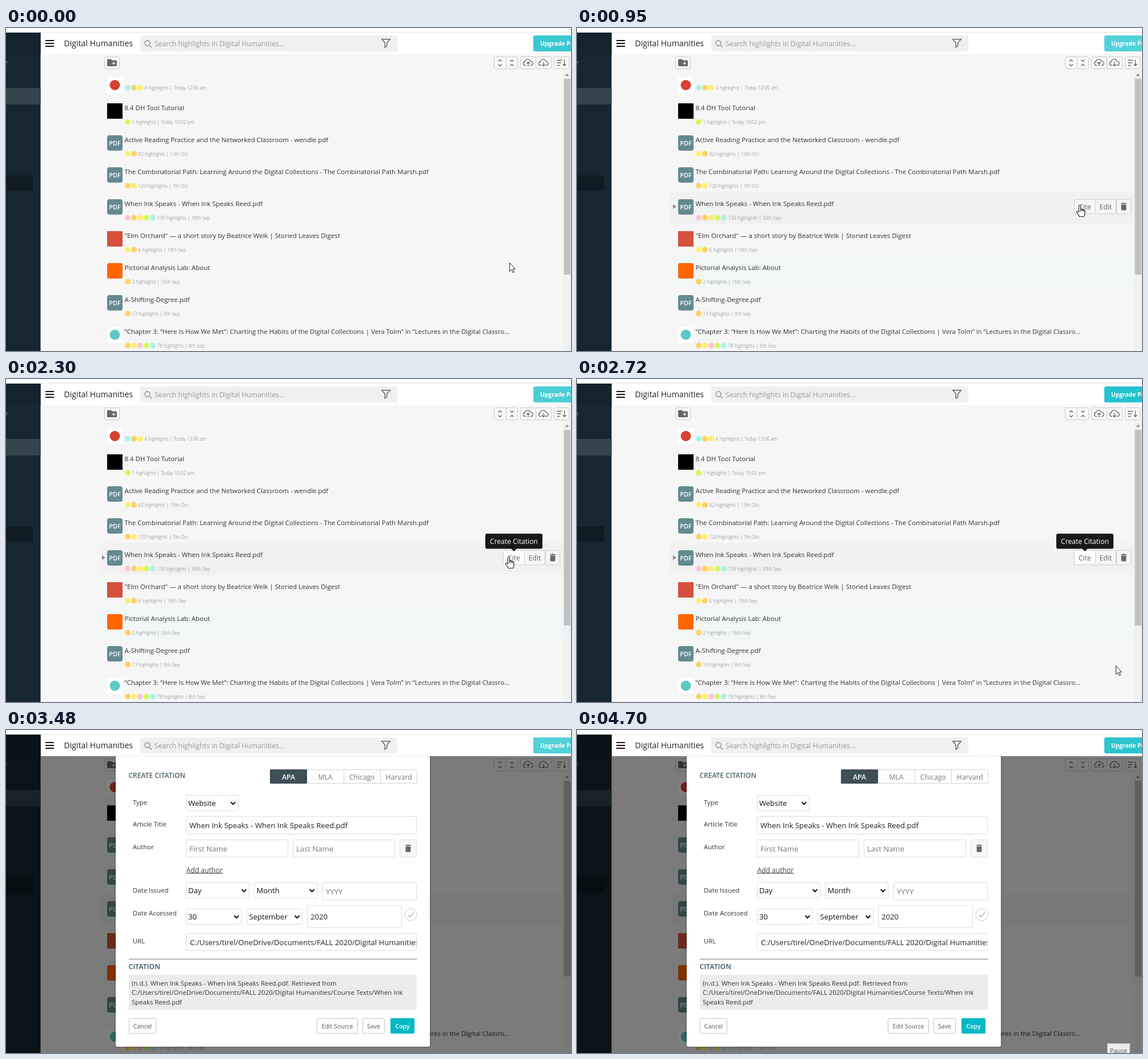
Recreate the animation shown at these times as an HTML page. Size 989x566 px, loop 4.75 s.

```html
<!DOCTYPE html>
<html lang="en">
<head>
<meta charset="utf-8">
<title>Create citation</title>
<style>
html, body { margin: 0; width: 100%; height: 100%; overflow: hidden; background: #fff; }
svg { display: block; }
text { font-family: "Open Sans", "Noto Sans", sans-serif; white-space: pre; }
.icon { fill: none; stroke: #666; stroke-width: 1.3; }
.mid { text-anchor: middle; }

#upgrade, #hover, #tools, #cite, #tip, #modal, #cursor, #arrow, #hand, #pause, #pauseBg {
  animation: 4750ms linear infinite;
}
#upgrade { animation-name: pulse; }
#hover { animation-name: hover; animation-timing-function: step-end; }
#tools { animation-name: tools; animation-timing-function: step-end; }
#cite { animation-name: cite; }
#tip { animation-name: tip; animation-timing-function: step-end; }
#modal { animation-name: modal; animation-timing-function: step-end; }
#cursor { animation-name: move; }
#arrow { animation-name: arrow; animation-timing-function: step-end; }
#hand { animation-name: hand; animation-timing-function: step-end; }
#pause { animation-name: pause; animation-timing-function: step-end; }
#pauseBg { animation-name: dim; animation-timing-function: step-end; }

@keyframes pulse {
  0%, 10.5% { fill: #3bc8d1; }
  20% { fill: #53d1d9; }
  30.7%, 36.2% { fill: #17bfcb; }
  48.4% { fill: #4bcfd7; }
  57.26% { fill: #26c3ce; }
  58.3% { fill: #22c2cc; }
  62% { fill: #14bec9; }
  73.7% { fill: #53d1d9; }
  86.7% { fill: #2ac4ce; }
  92.6% { fill: #17bfcb; }
  98.9%, 100% { fill: #2cc5cf; }
}
@keyframes hover {
  0% { opacity: 0; transform: translateY(112px); }
  11.4% { opacity: 1; transform: translateY(112px); }
  12.7% { opacity: 1; transform: translateY(56px); }
  15.9%, 100% { opacity: 1; transform: none; }
}
@keyframes tools { 0% { opacity: 1; } 58.3%, 100% { opacity: 0; } }
@keyframes cite { 0%, 20.8% { fill: #f6f6f6; } 23%, 100% { fill: #fff; } }
@keyframes tip { 0% { opacity: 0; } 21% { opacity: 1; } 58.3%, 100% { opacity: 0; } }
@keyframes modal { 0% { opacity: 0; } 58.3%, 100% { opacity: 1; } }
@keyframes move {
  0% { transform: translate(881px, 411px); }
  10.53% { transform: translate(881px, 411px); animation-timing-function: ease-in-out; }
  19.4%, 20.8% { transform: translate(881px, 310px); }
  22.5% { transform: translate(881px, 311px); }
  26% { transform: translate(876px, 311px); }
  30.7%, 36.2% { transform: translate(881px, 311px); }
  40% { transform: translate(879px, 311px); }
  44% { transform: translate(881px, 311px); }
  48.4% { transform: translate(881px, 311px); animation-timing-function: ease-in-out; }
  56.9%, 57.5% { transform: translate(943px, 502px); }
  58.3%, 60% { transform: translate(943px, 511px); }
  69.5%, 100% { transform: translate(947px, 570px); }
}
@keyframes arrow { 0% { opacity: 1; } 17% { opacity: 0; } 50.1%, 100% { opacity: 1; } }
@keyframes hand { 0% { opacity: 0; } 17% { opacity: 1; } 50.1%, 100% { opacity: 0; } }
@keyframes pause { 0% { opacity: 0; } 74% { opacity: 1; } 100% { opacity: 1; } }
@keyframes dim { 0% { fill: #fff; } 98.9%, 100% { fill: #ececec; } }
</style>
</head>
<body>
<svg id="stage" width="989" height="566" viewBox="0 0 989 566" xmlns="http://www.w3.org/2000/svg"></svg>
<script>
const rect = (x, y, x2, y2, fill, r = 0, id = '') =>
  `<rect ${id && `id="${id}"`} x="${x}" y="${y}" width="${x2 - x}" height="${y2 - y}" rx="${r}" fill="${fill}"/>`;

// Outlined box whose 1px border lies inside the given edges
const box = (x, y, x2, y2, fill = '#fff', line = '#ddd', r = 1, id = '') =>
  `<rect ${id && `id="${id}"`} x="${x + .5}" y="${y + .5}" width="${x2 - x - 1}" height="${y2 - y - 1}" rx="${r}" fill="${fill}" stroke="${line}"/>`;

const txt = (x, y, size, str, fill = '#333', weight = 400, extra = '') =>
  `<text x="${x}" y="${y}" font-size="${size}" fill="${fill}" font-weight="${weight}" ${extra}>${str}</text>`;

const mid = (x, y, size, str, fill, weight) => txt(x, y, size, str, fill, weight, 'class="mid"');
const icon = (d, extra = '') => `<path class="icon" d="${d}" ${extra}/>`;
const solid = (d, fill) => `<path d="${d}" fill="${fill}"/>`;
const circle = (x, y, r, fill) => `<circle cx="${x}" cy="${y}" r="${r}" fill="${fill}"/>`;

const trash = (x, y) => `<g transform="translate(${x} ${y})">` +
  solid('M-5-6h3l1-1h2l1 1h3v1.5h-10zM-4.4-3.6h8.8v8.4q0 1.7-1.6 1.7h-5.6q-1.6 0-1.6-1.7z', '#666') + '</g>';

const dots = { p: '#fbc5d8', o: '#fdd365', y: '#fef06e', g: '#d3fa5c', c: '#a8f4ee' };

const pdf = y => rect(177, y - 13.5, 204, y + 13.5, '#648a8f', 4) + mid(190.5, y + 4, 11, 'PDF', '#fff', 600);
const tile = (fill, r) => y => rect(177, y - 13.5, 204, y + 13.5, fill, r);
const disc = fill => y => rect(177, y - 13.5, 204, y + 13.5, '#fff') + circle(190.5, y, 9, fill);

const rows = [
  [disc('#d8412f'), '', 'coy', '4 highlights | Today 12:06 am'],
  [tile('#000'), '8.4 DH Tool Tutorial', 'g', '1 highlights | Today 10:02 pm'],
  [pdf, 'Active Reading Practice and the Networked Classroom - wendle.pdf', 'yo', '42 highlights | 13th Oct'],
  [pdf, 'The Combinatorial Path: Learning Around the Digital Collections - The Combinatorial Path Marsh.pdf', 'oy', '129 highlights | 7th Oct'],
  [pdf, 'When Ink Speaks - When Ink Speaks Reed.pdf', 'poygc', '139 highlights | 30th Sep'],
  [tile('#d4513d'), '"Elm Orchard" — a short story by Beatrice Welk | Storied Leaves Digest', 'yo', '6 highlights | 19th Sep'],
  [tile('#ff6600', 3), 'Pictorial Analysis Lab: About', 'o', '2 highlights | 16th Sep'],
  [pdf, 'A-Shifting-Degree.pdf', 'o', '13 highlights | 9th Sep'],
  [disc('#5cc9c4'), '“Chapter 3: “Here Is How We Met”: Charting the Habits of the Digital Collections | Vera Tolm” in “Lectures in the Digital Classro...', 'oypgc', '78 highlights | 8th Sep']
];

function row([mark, title, marks, meta], i) {
  const y = i ? 145 + 56 * (i - 1) : 99.5;
  const my = i ? y + 19.5 : 104.8;
  return mark(y + .5) + txt(207.5, y - 1, 11.45, title) +
    [...marks].map((c, k) => circle(213 + 11 * k, my, 5, dots[c])).join('') +
    txt(209.5 + 11 * marks.length, my + 3.2, 8.2, meta, '#777', 300);
}

const cloud = 'M-4 4.5h-1.5a3.3 3.3 0 0 1-.4-6.5a5.2 5.2 0 0 1 10-.6a3.6 3.6 0 0 1 1.2 7.1h-1.3M0';
const toolButton = (x, x2, d) => box(x, 50, x2, 72, '#f8f8f8', '#c9c9c9', 2) +
  icon(d, `transform="translate(${(x + x2) / 2} 61)"`);

const sidebar = rect(0, 8, 60.5, 566, '#162731') + rect(0, 8, 60.5, 46, '#13242e') +
  rect(0, 105, 60.5, 134, '#33444c') + rect(0, 258, 48, 285, '#0f1c24') +
  txt(-1.5, 65, 11.4, 'r', '#a9b3b8');

const toolbar = box(172, 50, 199, 72, '#f8f8f8', '#c9c9c9', 2) +
  solid('M177 56q0-1.5 1.500-1.500h5l2 2h7q1.500 0 1.500 1.500v7.500q0 1.500-1.500 1.500h-14q-1.500 0-1.500-1.500z', '#666') +
  icon('M188.500 58.800v6M185.500 61.800h6', 'style="stroke:#f8f8f8"') +
  toolButton(854, 876, 'M-3-2.500L0-5.500L3-2.500M-3 2.500L0 5.500L3 2.500') +
  toolButton(875, 896, 'M-3-5.500L0-2.500L3-5.500M-3 5.500L0 2.500L3 5.500') +
  toolButton(900, 928, cloud + ' 6v-7M-2.800 1.500L0-1.300L2.800 1.500') +
  toolButton(927, 955, cloud + '-1.500v7M-2.800 2.800L0 5.600L2.800 2.800') +
  toolButton(959, 986, 'M-8-4.500h9M-8 0h7M-8 4.500h5M5-5.500v10.500M2.200 2.200L5 5L7.800 2.200');

const scrollbar = rect(975, 73, 989, 566, '#f1f1f1') + solid('M978.500 84h7l-3.500-4z', '#8a8a8a') +
  rect(976.5, 89, 988, 432, '#c1c1c1');

const hover = `<g id="hover">${rect(164, 287, 975, 343, '#f1f1f1')}<g id="tools">` +
  solid('M168 309v8l6-4z', '#8b8b8b') +
  box(870, 300, 908, 326, '#f6f6f6', '#cfcfcf', 1, 'cite') + box(907, 300, 944, 326, '#f6f6f6', '#cfcfcf') +
  box(944, 300, 970, 326, '#f6f6f6', '#cfcfcf') +
  mid(889, 317.5, 12.2, 'Cite', '#666') + mid(925.5, 317.5, 12.2, 'Edit', '#666') + trash(957, 313) + '</g></g>';

const trail = `<g style="animation:modal 4750ms infinite step-end;animation-name:trail">${rect(164, 399, 975, 455, '#f2f6f7')}</g>`;

const tip = `<g id="tip">${rect(839, 271, 939, 297.5, '#191919', 3)}${solid('M884 297h10l-5 5z', '#191919')}` +
  mid(889, 289, 12.1, 'Create Citation', '#fff', 500) + '</g>';

const header = rect(0, 0, 989, 8, '#fff') + rect(61, 7, 989, 8, '#e4e4e4') + rect(61, 8, 989, 45.5, '#fff') +
  [21, 26, 31].map(y => rect(69, y, 84, y + 2, '#111')).join('') +
  txt(101.5, 32, 14.1, 'Digital Humanities', '#222') +
  rect(235, 13, 685, 41, '#eff0f0', 2) +
  icon('M251.500 30.500l3.500 3.500M252 26.500a4.500 4.500 0 1 1-9 0a4.500 4.500 0 1 1 9 0', 'style="stroke:#888"') +
  txt(260, 31.5, 12.2, 'Search highlights in Digital Humanities...', '#999') +
  icon('M657.800 19.700h14.400l-5.400 6.300v5.500l-3.600 2.500v-8z', 'style="stroke:#555"') +
  rect(923, 13, 1010, 41, '#3bc8d1', 3, 'upgrade') + txt(935, 31, 10.3, 'Upgrade Pro', '#fff', 700);

const label = (y, str) => txt(222, y, 11.4, str);
const field = (x, y, x2, y2, str, fill = '#222') => box(x, y, x2, y2) + txt(x + 6, (y + y2) / 2 + 5, 13.1, str, fill);
const select = (x, y, x2, str) => box(x, y, x2, y + 28) + txt(x + 4, y + 19, 13, str, '#111') +
  icon(`M${x2 - 13.5} ${y + 12.3}l4 4l4-4`, 'style="stroke:#111;stroke-width:2"');
const button = (x, x2, str) => box(x, 505, x2, 532, '#fff', '#c4c4c4') + mid((x + x2) / 2, 523, 10.5, str, '#555');

const dir = 'C:/Users/tirel/OneDrive/Documents/FALL 2020/Digital Humanities/Course Texts/When Ink';
const doc = 'When Ink Speaks - When Ink Speaks Reed.pdf';

const tabs = ['APA', 'MLA', 'Chicago', 'Harvard'].map((s, i) => {
  const x = 462 + 64.4 * i, on = i === 0;
  return (on ? rect(462, 69, 527, 94, '#3f4f58', 2) : i > 1 ? rect(Math.round(x), 69, Math.round(x) + 1, 94, '#d2d2d2') : '') +
    mid(x + 32.5, 86.5, 12.2, s, on ? '#fff' : '#777', on ? 600 : 400);
}).join('');

const modal = `<g id="modal">
  <path d="M0 8H60.500V45.500H989V566H0z" fill="#000" opacity=".5"/>
  ${rect(190, 46, 744, 557, 'rgba(0,0,0,.12)', 4)}${rect(192, 45.5, 742, 555, '#fff', 3)}
  ${txt(214.5, 84, 12, 'CREATE CITATION', '#4d5f69', 600)}
  ${box(462, 69, 720, 94, '#fff', '#d2d2d2', 2)}${tabs}
  ${label(131, 'Type')}${select(315, 114, 407, 'Website')}
  ${label(169, 'Article Title')}${field(315, 151, 719, 183, doc)}
  ${label(209, 'Author')}${field(315, 192, 494, 223, 'First Name', '#777')}${field(502, 192, 681, 223, 'Last Name', '#777')}
  ${box(689, 192, 719, 223, '#faf8f6')}${trash(704, 207.5)}
  ${txt(315.5, 249.5, 12.1, 'Add author', '#444', 400, 'text-decoration="underline"')}
  ${label(284.5, 'Date Issued')}${select(315, 267, 426, 'Day')}${select(434.5, 267, 545, 'Month')}${field(554, 267, 719, 298, 'YYYY', '#777')}
  ${label(325, 'Date Accessed')}${select(315, 313, 413, '30')}${select(421.5, 313, 519, 'September')}${field(527, 307, 693, 347, '2020')}
  <circle cx="708.500" cy="323.500" r="10.500" fill="#fff" stroke="#ccc"/>
  ${icon('M703.500 324l3.500 3.500l7-8', 'style="stroke:#b5b5b5;stroke-width:1.600"')}
  ${label(373.5, 'URL')}${box(315, 356, 719, 387)}
  <svg x="316" y="357" width="402" height="29">${txt(6, 20, 13.1, dir, '#222')}</svg>
  ${rect(215, 401, 719, 402, '#777')}
  ${txt(214.5, 419, 12, 'CITATION', '#5c6f79', 700)}
  ${rect(215, 429, 719, 490, '#ececec')}
  ${['(n.d.). ' + doc + '. Retrieved from', dir, 'Speaks Reed.pdf'].map((s, i) => txt(220, 447.5 + 16.7 * i, 11.4, s)).join('')}
  ${button(215, 263, 'Cancel')}${button(544, 616, 'Edit Source')}${button(624, 663, 'Save')}
  ${rect(673, 505, 715, 532, '#00b8c4', 2)}${mid(694, 523, 10.5, 'Copy', '#fff', 600)}
</g>`;

const pause = `<g id="pause">${box(928, 549, 968, 580, '#fff', '#c6c6c6', 0, 'pauseBg')}${mid(948, 566, 10.8, 'Pause', '#555')}</g>`;

const cursor = `<g id="cursor" stroke="#222" stroke-linejoin="round" fill="#fff">
  <path id="arrow" d="M.5.5V15.500L4 12.300L6.300 17.700L8.500 16.800L6.200 11.400H10.300z"/>
  <path id="hand" d="M-2.500 12.500V2Q-2.500.5-1 .5T.6 2V8Q2 6.500 3.300 8.300Q5 7.200 5.800 9Q8 8.500 8 10.500V15Q8 18 6.200 20.500H-1.500Q-3.500 17-6 13.500Q-7 11.500-5.200 11Q-4 11-2.500 12.500zM.6 8V11.500M3.300 8.500V11.500M5.800 9.200V12" stroke-width="1.200"/>
</g>`;

const fade = document.createElement('style');
fade.textContent = '@keyframes trail { 0% { opacity: 0 } 12.7%, 100% { opacity: 1 } }';
document.head.append(fade);

document.getElementById('stage').innerHTML =
  rect(0, 0, 989, 566, '#f6f6f6') + sidebar + trail + hover + rows.map(row).join('') +
  toolbar + scrollbar + tip + modal + header + pause + cursor;
</script>
</body>
</html>
```
